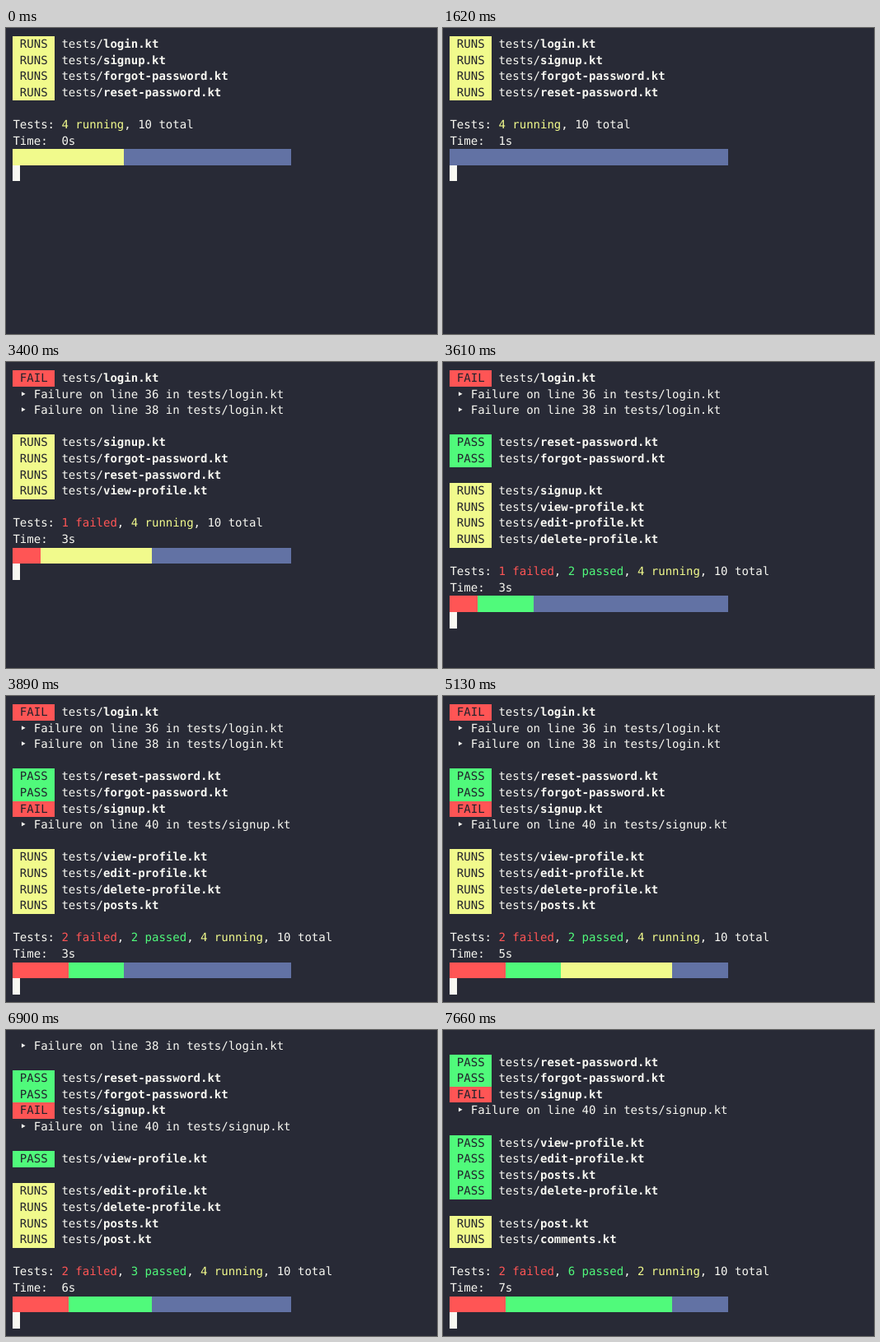
An HTML page with a canvas that plays this animation: 523 px wide and 372 px high, repeating every 8 s.

```html
<!DOCTYPE html>
<html lang="en">
<head>
<meta charset="utf-8">
<title>Test run</title>
<style>
  html, body { margin: 0; width: 100%; height: 100%; overflow: hidden; background: #282a36; }
  canvas { display: block; }
</style>
</head>
<body>
<canvas id="term" width="523" height="372"></canvas>
<script>
const LOOP = 8000, ROWS = 18, BAR = 40;
const SIZE = 14, CELL_W = SIZE * 0.602, CELL_H = SIZE * 1.4;
const LEFT = CELL_W, TOP = 10;
const C = {
  bg: '#282a36', fg: '#f8f8f2', ink: '#21222c',
  red: '#ff5555', green: '#50fa7b', yellow: '#f1fa8c', idle: '#6272a4'
};
const BADGE = { RUNS: C.yellow, PASS: C.green, FAIL: C.red };

// Tests in the order they start; at most four run at once.
const queue = ['login', 'signup', 'forgot-password', 'reset-password', 'view-profile',
  'edit-profile', 'delete-profile', 'posts', 'post', 'comments'];
const failures = { login: [36, 38], signup: [40] };

// [time in ms, test that finishes]
const finishes = [
  [3400, 'login'], [3550, 'reset-password'], [3550, 'forgot-password'], [3890, 'signup'],
  [6900, 'view-profile'], [7050, 'edit-profile'], [7050, 'posts'], [7660, 'delete-profile']
];
const seconds = [1090, 2030, 3100, 4100, 5050, 6110, 7050];
const blinks = [600, 1090, 1620, 2100, 2630, 3100, 3610, 4100, 4620, 5130, 5590, 6110, 6610, 7110, 7660];

const ctx = document.getElementById('term').getContext('2d', { alpha: false });
ctx.textRendering = 'geometricPrecision';
const passed = (times, t) => times.filter(at => at <= t).length;
const colX = col => LEFT + col * CELL_W;
const rowY = row => Math.round(TOP + row * CELL_H);

// A line is a list of spans.
const span = (text, color = C.fg, bg = null, bold = false) => ({ text, color, bg, bold });
const testLine = (badge, name) => [
  span(` ${badge} `, C.ink, BADGE[badge]), span(' tests/'), span(`${name}.kt`, C.fg, null, true)
];
const block = (cells, color) => span(' '.repeat(cells), C.fg, color);

function screen(t) {
  const done = finishes.filter(([at]) => at <= t).map(([, name]) => name);
  const running = queue.filter(name => !done.includes(name)).slice(0, 4);
  const failed = done.filter(name => failures[name]).length;
  const ok = done.length - failed;
  const lines = [];

  for (const name of done) {
    const bad = failures[name];
    lines.push(testLine(bad ? 'FAIL' : 'PASS', name));
    if (!bad) continue;
    for (const n of bad) lines.push([span(` ‣ Failure on line ${n} in tests/${name}.kt`)]);
    lines.push([]);
  }
  if (lines.length && lines[lines.length - 1].length) lines.push([]);
  for (const name of running) lines.push(testLine('RUNS', name));

  const summary = [span('Tests: ')];
  const count = (n, label, color) => {
    if (n) summary.push(span(`${n} ${label}`, color), span(', '));
  };
  count(failed, 'failed', C.red);
  count(ok, 'passed', C.green);
  count(running.length, 'running', C.yellow);
  summary.push(span(`${queue.length} total`));

  const unit = BAR / queue.length;
  const lit = passed(blinks, t) % 2 === 0;
  const rest = BAR - unit * (done.length + running.length);
  lines.push([], summary, [span(`Time:  ${passed(seconds, t)}s`)], [
    block(unit * failed, C.red), block(unit * ok, C.green),
    block(unit * running.length, lit ? C.yellow : C.idle), block(rest, C.idle)
  ], [block(1, C.fg)]);
  return lines.slice(-ROWS);
}

function drawLine(spans, row) {
  const y = rowY(row);
  let col = 0;
  for (const { text, color, bg, bold } of spans) {
    const end = col + text.length;
    if (bg) {
      const x = Math.round(colX(col));
      ctx.fillStyle = bg;
      ctx.fillRect(x, y, Math.round(colX(end)) - x, rowY(row + 1) - y);
    }
    ctx.fillStyle = color;
    ctx.font = `${bold ? 'bold ' : ''}${SIZE}px "DejaVu Sans Mono", monospace`;
    [...text].forEach((char, i) => {
      if (char !== ' ') ctx.fillText(char, colX(col + i), y + SIZE);
    });
    col = end;
  }
}

function frame() {
  ctx.fillStyle = C.bg;
  ctx.fillRect(0, 0, 523, 372);
  screen(performance.now() % LOOP).forEach(drawLine);
  requestAnimationFrame(frame);
}
frame();
</script>
</body>
</html>
```
